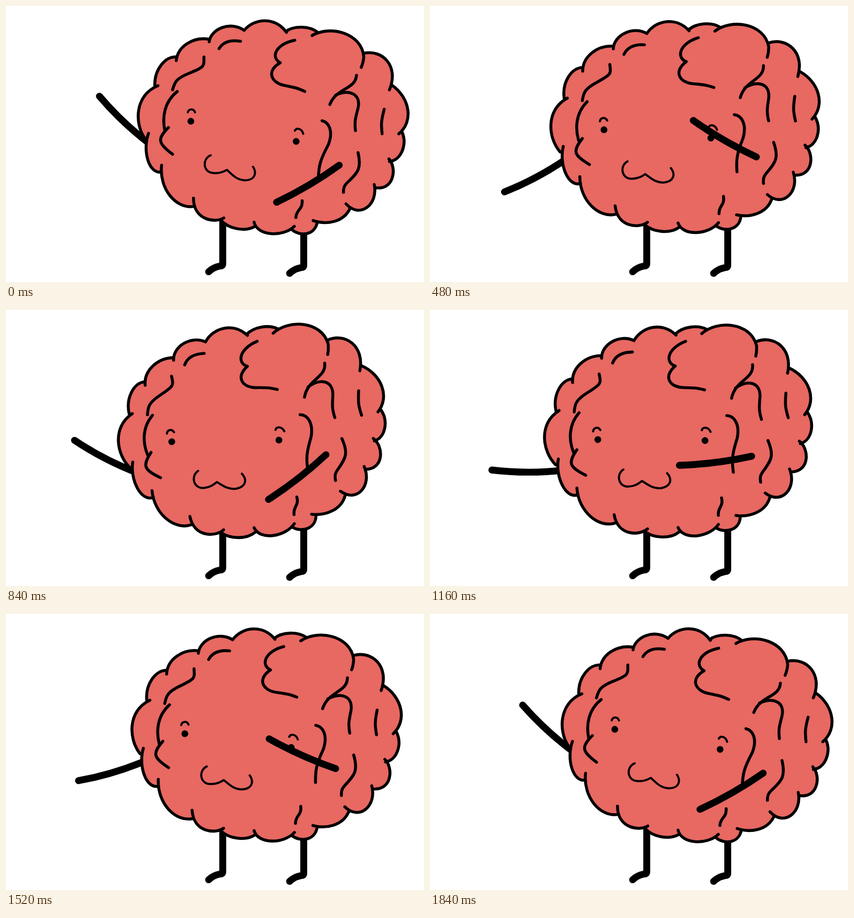
Write an HTML page that moves like this. It is 800x528 px and loops after 1880 ms.

```html
<!DOCTYPE html>
<html lang="en">
<head>
<meta charset="utf-8">
<title>Waving brain</title>
<style>
  html, body { margin: 0; height: 100%; overflow: hidden; background: #fff; }
  svg { display: block; width: 100%; height: 100%; }
  path { fill: none; stroke: #000; stroke-linecap: round; stroke-linejoin: round; }
  .limb { stroke-width: 13.2; }
  .line { stroke-width: 5.6; }
  .thin { stroke-width: 4; }
  #fill { fill: #e86862; stroke: none; }
</style>
</head>
<body>
<svg viewBox="-.8 -.5 800 528">
  <path class="limb" d="M414 400V493Q414 497 409 497Q396 499 387 508M569 405V496Q569 500 564 500Q551 502 542 511"/>
  <g id="body">
    <path id="left" class="limb" d="M178 172Q222 224 278 266"/>
    <path id="fill"/>
    <path id="lobes" class="line"/>
    <path class="line" d="M407 81C415 68 430 64 448 67
      M378 97C378 115 380 116 350 128C325 138 322 145 318 160
      M327 163C302 183 298 212 303 237M310 232C288 254 290 262 318 283
      M552 65C515 72 505 98 524 108C495 125 508 148 535 152C555 156 558 157 571 163
      M670 132C668 160 632 155 619 188M630 170C657 158 679 168 673 195C668 214 666 220 668 238
      M723 197C717 220 717 225 719 244
      M604 219C618 222 626 240 616 265C600 295 598 305 597 328
      M673 280C680 310 672 318 658 332C647 342 645 345 645 356
      M566 372C567 390 555 388 554 404"/>
    <path class="thin" d="M347 203C349 196 358 195 361 203M552 238C555 232 565 233 568 244
      M391 285C374 292 376 318 396 319C408 320 414 317 422 313C432 322 440 332 456 333C475 333 480 320 472 307"/>
    <circle cx="353" cy="220" r="6.5"/>
    <circle cx="554.5" cy="258.5" r="6.5"/>
    <path id="right" class="limb" d="M517 375Q580 345 637 304"/>
  </g>
</svg>
<script>
const $ = id => document.getElementById(id);

// Outline, clockwise: each lobe is one curve whose ends poke inwards
const lobes = `M325 104C328 76 358 58 388 63 M388 68C392 42 430 28 455 46
  M455 46C475 22 515 20 536 50 M535 48C550 37 580 37 596 50
  M585 56C618 36 680 50 684 97Q683 108 679 117 M684 90C720 82 752 115 733 160
  M738 151C772 175 780 220 751 244 M757 240C768 265 755 295 733 297
  M732 292C748 309 742 353 706 347 M704 341C712 380 676 407 650 378
  M658 386C645 415 610 418 587 410 M595 413C590 440 560 440 546 427
  M551 421C530 442 480 440 474 413 M474 422C455 432 425 425 411 410
  M416 405C400 415 358 410 358 367 M358 383C325 388 292 350 297 304
  M297 317C272 322 260 275 272 243 M265 253C245 225 245 170 290 152
  M284 152C283 120 305 95 325 97`;
$('lobes').setAttribute('d', lobes);
$('fill').setAttribute('d', 'M' + lobes.slice(1).replace(/M/g, 'L') + 'Z');

// cubic-bezier(.42, 0, .58, 1)
function ease(u) {
  let s = u;
  for (let i = 0; i < 5; i++)
    s -= (1.26 * s - .78 * s * s + .52 * s ** 3 - u) / (1.26 - 1.56 * s + 1.56 * s * s);
  return s * s * (3 - 2 * s);
}

// Swings between 0 and 1, turning round at each of the given times
function swing(t, turns) {
  const i = turns.findIndex(end => t < end);
  const v = ease((t - turns[i - 1]) / (turns[i] - turns[i - 1]));
  return i % 2 ? v : 1 - v;
}

const turn = (id, angle, x, y) =>
  $(id).setAttribute('transform', `rotate(${angle} ${x} ${y})`);

function draw(now) {
  const t = now % 1880;
  const wave = swing(t, [0, 480, 920, 1400, 1880]);
  turn('body', -11.85 * swing(t, [0, 920, 1880]), 488.7, 414.5);
  turn('left', -65 * wave, 278, 266);
  turn('right', 67 * wave, 637, 304);
}

const start = performance.now();
function frame() {
  draw(performance.now() - start);
  requestAnimationFrame(frame);
}
frame();
</script>
</body>
</html>
```
